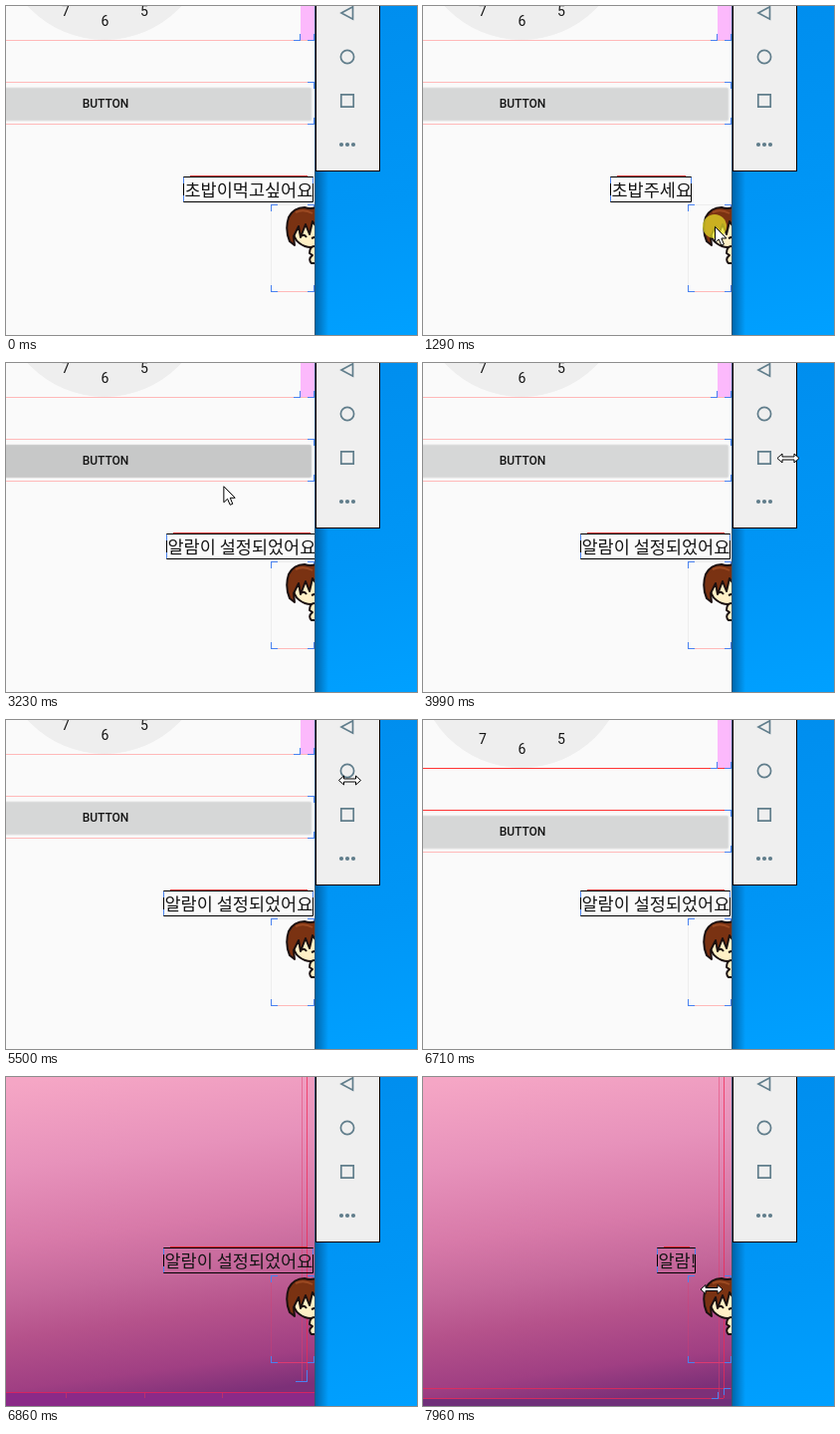
Animation of 413 by 330 pixels, one loop 8 s. Source, as an HTML page with a canvas:

```html
<!DOCTYPE html>
<html lang="ko">
<head>
<meta charset="utf-8">
<style>
  html, body { margin: 0; width: 413px; height: 330px; overflow: hidden; }
  canvas { display: block; }
</style>
</head>
<body>
<canvas id="stage" width="413" height="330"></canvas>
<script>
const W = 413, H = 330, LOOP = 8000, EDGE = 310;
const g = document.getElementById('stage').getContext('2d');
const BLUE = '#4a82f0', PALE = '#ffb9b9';

const LABEL_FONT = '17.5px "Noto Sans CJK KR", "Noto Sans CJK", "Noto Sans CJK JP", sans-serif';
// start time, text, resting left edge
const labels = [
  [-1000, '초밥이먹고싶어요', 178],
  [1290, '초밥주세요', 227],
  [3080, '알람이 설정되었어요', 158],
  [7890, '알람!', 270]
];

// start, end, number of steps, shape, from, bend, to
const moves = [
  [210, 290, 2, 'arrow', [288, 297], [294, 274], [300, 252]],
  [520, 600, 2, 'arrow', [301, 244], [300, 240], [299, 236]],
  [830, 1060, 4, 'arrow', [298, 233], [295, 227], [293, 221]],
  [1290, 1440, 3, 'arrow', [293, 221], [293, 221], [293, 221]],
  [1440, 1980, 8, 'arrow', [293, 221], [350, 165], [200, 104]],
  [3080, 3840, 11, 'arrow', [200, 104], [245, 150], [299, 218]],
  [3910, 3990, 2, 'resize', [338, 140], [352, 115], [367, 95.5]],
  [4060, 4370, 5, 'resize', [364, 88], [352, 70], [345, 64]],
  [4540, 4620, 2, 'resize', [344.5, 62], [344, 61], [343.5, 61]],
  [5500, 5640, 2, 'resize', [345.5, 60.5], [345.5, 60.5], [345.5, 60.5]],
  [5640, 5640, 1, 'none', [0, 0], [0, 0], [0, 0]],
  [7570, 7720, 3, 'resize', [370, 230], [325, 221], [281, 212]],
  [7890, 7960, 2, 'resize', [285, 212.5], [288, 213], [290, 213]]
];

function rect(x, y, w, h, color) {
  g.fillStyle = color;
  g.fillRect(x, y, w, h);
}
const hline = (x, y, w, color) => rect(x, y, w, 1, color);
const vline = (x, y, h, color) => rect(x, y, 1, h, color);

// Corner mark reaching from (x, y) along dx and dy
function corner(x, y, dx, dy, n = 7) {
  hline(dx > 0 ? x : x - n + 1, y, n, BLUE);
  vline(x, dy > 0 ? y : y - n + 1, n, BLUE);
}

function shape(path, fill, stroke, width = 1) {
  const p = path instanceof Path2D ? path : new Path2D(path);
  if (fill) { g.fillStyle = fill; g.fill(p); }
  if (stroke) { g.strokeStyle = stroke; g.lineWidth = width; g.stroke(p); }
}

function disc(x, y, r, fill, stroke, width) {
  const p = new Path2D();
  p.arc(x, y, r, 0, 7);
  shape(p, fill, stroke, width);
}

function text(s, x, y, font, align = 'center') {
  g.font = font;
  g.textAlign = align;
  g.fillStyle = '#151515';
  g.fillText(s, x, y);
}

function gradient(x0, y0, x1, y1, ...stops) {
  const grad = g.createLinearGradient(x0, y0, x1, y1);
  stops.forEach(([at, color]) => grad.addColorStop(at, color));
  return grad;
}

function drawDesktop() {
  rect(EDGE, 0, W - EDGE, H, gradient(340, 0, 400, H, [0, '#008eee'], [.6, '#0096f6'], [1, '#00a0ff']));
  rect(EDGE, 0, 14, H, gradient(EDGE, 0, EDGE + 14, 0, [0, 'rgba(0,40,80,.5)'], [1, 'rgba(0,40,80,0)']));
  rect(EDGE, 0, 1, H, '#2c5878');
}

function drawToolbar() {
  rect(311, -1, 65, 167, '#000');
  rect(312, -1, 63, 166, '#efefef');
  const ink = '#607d8b';
  shape('M337 7L348.5 .8V13.2Z', null, ink, 1.7);
  disc(343, 51, 6.6, null, ink, 1.7);
  shape('M336.8 88.8h12.4v12.4h-12.4Z', null, ink, 1.7);
  for (const x of [337, 343, 349]) disc(x, 139, 2.1, ink);
}

function drawMainPage(t) {
  const late = t >= 6710, dy = late ? 14 : 0;
  rect(0, 0, EDGE, H, '#fafafa');
  g.save();
  g.translate(0, dy);
  disc(99, -71, 105, '#eeeeee');
  [['7', 60], ['6', 99.5], ['5', 139]].forEach(([s, x], i) =>
    text(s, x, i === 1 ? 20 : 10, '14px Roboto, sans-serif'));
  rect(296, -20, 14, 54, '#fcb9fc');
  hline(0, 34, EDGE, late ? '#ff3434' : PALE);
  hline(0, 76, EDGE, late ? '#ff3434' : PALE);
  hline(0, 118, EDGE, PALE);
  corner(295, 34, -1, -1);
  corner(309, 34, -1, -1);
  corner(309, 76, -1, 1);
  corner(309, 118, -1, -1);
  const button = new Path2D();
  button.roundRect(-5, 82, 312, 33, 2);
  shape(button, '#d6d7d7', '#e4e4e4');
  const press = t >= 3080 ? Math.max(0, 1 - (t - 3080) / 500) : 0;
  if (press) shape(button, `rgba(0,0,0,${.1 * press})`);
  text('BUTTON', 100, 102, '500 12px Roboto, sans-serif');
  g.restore();
}

function drawAlarmPage(t) {
  const settling = t < 6940;
  g.save();
  g.globalAlpha = t < 6860 ? .6 : 1;
  rect(0, 0, EDGE, H, gradient(130, -10, 175, 325,
    [0, '#f5a6c5'], [.25, '#e792bb'], [.47, '#d87aa9'], [.62, '#c5689b'],
    [.75, '#b5528b'], [.9, '#a03f83'], [1, '#7c3078']));
  const red = 'rgba(238,40,84,.75)', bottom = settling ? 305 : 322;
  vline(297, 0, bottom, 'rgba(225,60,110,.5)');
  vline(302, 0, bottom, red);
  if (settling) {
    rect(0, 317, EDGE, 13, '#8b2a88');
    hline(0, 316, EDGE, '#d52462');
    for (const x of [60, 139, 217]) vline(x, 317, 5, '#b8306f');
    corner(302, 305, -1, -1, 12);
  } else {
    rect(0, 323, EDGE, 7, '#70307a');
    hline(0, 312, EDGE, red);
    hline(0, 322, 302, red);
    corner(296, 322, -1, -1);
    corner(302, 312, 1, 1);
  }
  g.restore();
}

function drawAvatar(alarm) {
  vline(266, 199, 87, alarm ? 'rgba(220,60,110,.35)' : '#ededed');
  if (!alarm) hline(266, 199, 44, '#ededed');
  hline(266, 286, 44, alarm ? '#dd3a70' : PALE);
  corner(266, 199, 1, 1);
  corner(266, 286, 1, -1);
  corner(309, 199, -1, 1);
  corner(309, 286, -1, -1);
  g.lineJoin = 'round';
  shape('M289 215Q286 232 295 238Q303 244 312 241V212Z', '#fff0c6', '#1b1010', 2);
  shape('M312 202Q306 204 300 202Q289 202 284 212Q280 224 285 236L290 240L289 231L294 221L296 232L301 219L305 229L308 216L312 222Z', '#7a3212', '#1b1010', 2);
  shape('M291 207Q299 203 308 208', null, '#9c4a22', 2);
  shape('M297 231Q299 228 302 232M307 233L312 231', null, '#1b1010', 2);
  shape('M312 241Q305 240 305 248L308 250Q303 254 307 258H312', '#fff0c6', '#1b1010', 2);
}

function drawLabel(t) {
  const i = labels.findLastIndex(l => t >= l[0]);
  const [start, words, home] = labels[i];
  const from = i ? labels[i - 1][2] : home;
  const p = Math.min(1, (Math.floor((t - start) / 70) * 70 + 22) / 208);
  const x = Math.round(home + (from - home) * (1 - p) ** 2);
  const w = [131, 82, 151, 39][i];
  g.strokeStyle = '#000';
  g.lineWidth = 1;
  g.strokeRect(x + .5, 171.5, w - 1, 25);
  hline(x + 7, 170, w - 13, '#e02828');
  vline(x, 172, 6, BLUE);
  vline(x, 190, 6, BLUE);
  vline(x + w - 1, 172, 6, BLUE);
  text(words, x + 1.5, 190.5, LABEL_FONT, 'left');
}

function drawCursor(t) {
  const move = moves.findLast(m => t >= m[0]);
  if (!move) return;
  const [start, end, n, kind, a, b, c] = move;
  const k = n > 1 ? Math.min(n - 1, Math.floor((t - start) / (end - start) * (n - 1) + .05)) / (n - 1) : 1;
  const [x, y] = a.map((v, i) => (1 - k) ** 2 * v + 2 * k * (1 - k) * b[i] + k * k * c[i]);
  const clicked = (t >= 1290 && t < 1440) || (t >= 2760 && t < 2910);
  if (clicked) disc(x, y, 12, 'rgba(236,230,40,.7)');
  g.save();
  g.translate(x, y);
  g.lineJoin = 'miter';
  if (kind === 'arrow') shape('M.5 .5V16.5L4.2 13L6.8 19L9.4 18L6.9 12H11.8Z', '#fff', '#000');
  if (kind === 'resize') shape('M-11 0L-6 -4.5V-1.5H6V-4.5L11 0L6 4.5V1.5H-6V4.5Z', '#fff', '#000');
  g.restore();
}

function draw(t) {
  const alarm = t >= 6800;
  drawDesktop();
  g.save();
  g.beginPath();
  g.rect(0, 0, EDGE, H);
  g.clip();
  drawMainPage(t);
  if (alarm) drawAlarmPage(t);
  drawAvatar(alarm);
  drawLabel(t);
  g.restore();
  drawToolbar();
  drawCursor(t);
}

const began = performance.now();
function tick() {
  draw((performance.now() - began) % LOOP);
  requestAnimationFrame(tick);
}
tick();
</script>
</body>
</html>
```
